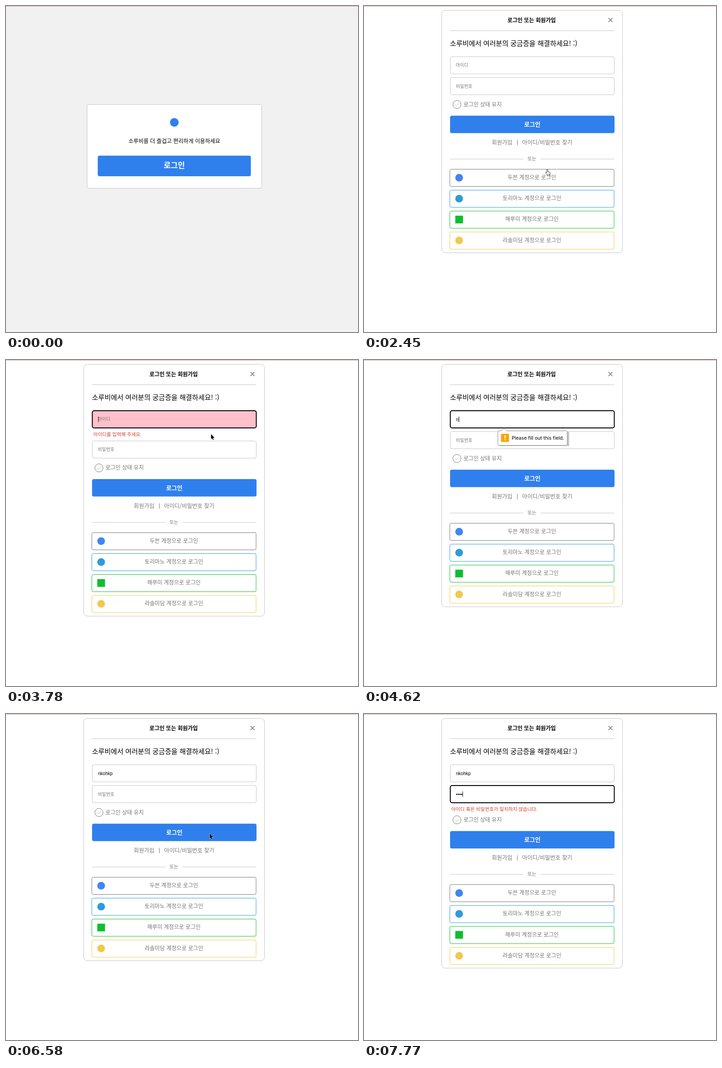
Animation, 777 px wide and 720 px high, one loop 8000 ms. Source, as an HTML page:

```html
<!DOCTYPE html>
<html lang="ko">
<head>
<meta charset="utf-8">
<title>로그인</title>
<style>
  html, body { margin: 0; width: 100%; height: 100%; overflow: hidden; background: #fff; }
  svg { display: block; width: 777px; height: 720px; }
  text { font: 400 12.1px 'Noto Sans CJK KR', 'Noto Sans CJK', 'Noto Sans KR', sans-serif; fill: #000; }
  .mid { text-anchor: middle; }
  .med { font-weight: 500; }
  .gray { fill: #767676; }
  .link { font-size: 12.4px; }
  .head { font-size: 15.1px; font-weight: 500; }
  .hint { font-size: 9.85px; fill: #767676; }
  .typed { font: 10.06px 'Liberation Sans', Arial, sans-serif; }
  .error { font-size: 10.6px; font-weight: 500; fill: #d33b2c; }
  .btn { font-size: 13.05px; font-weight: 700; fill: #fff; }
  .tip { font: 10.6px Inter, sans-serif; }
  .box { fill: #fff; stroke: #c4c4c4; }
  .line { stroke: #c4c4c4; }
  .blue { fill: #2f80ed; }
  .box.focus { stroke: #000; stroke-width: 2; }
  .box.bad { fill: #ffc0cb; }
</style>
</head>
<body>
<svg viewBox="0 0 777 720" xmlns="http://www.w3.org/2000/svg">
  <g id="welcome">
    <rect width="777" height="720" fill="#f1f1f1"/>
    <rect class="box" x="179" y="217.5" width="385.5" height="185" rx="4"/>
    <circle class="blue" cx="371.5" cy="257" r="9.5"/>
    <text class="mid med" x="371.5" y="302.6">소루비를 더 즐겁고 편리하게 이용하세요</text>
    <rect class="blue" x="202.5" y="330.5" width="338" height="45.5" rx="4"/>
    <text class="btn mid" x="371.5" y="358.4" style="font-size:17px">로그인</text>
  </g>

  <g id="login">
    <rect id="panel" class="box" x="171.5" y="9.5" width="399" height="535.5" rx="8"/>
    <text class="mid" x="370" y="35.6" style="font-weight:700">로그인 또는 회원가입</text>
    <path d="M539.5 26.5l9 9m0-9l-9 9" stroke="#767676" stroke-width="1.6"/>
    <path class="line" d="M190 54.5H552"/>
    <text class="head" x="189.7" y="87.7">소루비에서 여러분의 궁금증을 해결하세요! :)</text>

    <rect id="idBox" class="box" x="190.5" y="112" width="362" height="38" rx="4"/>
    <text id="idHint" class="hint" x="202.8" y="134.4">아이디</text>
    <text id="idText" class="typed" x="203" y="134.6"></text>
    <rect id="idCaret" y="125" width="1" height="12"/>
    <text id="idError" class="error" x="192.8" y="167.5">아이디를 입력해 주세요.</text>

    <g id="pw">
      <rect id="pwBox" class="box" x="190.5" y="158" width="362" height="38" rx="4"/>
      <text id="pwHint" class="hint" x="202.8" y="180.6">비밀번호</text>
      <g id="dots"></g>
      <rect id="pwCaret" y="171" width="1" height="12"/>
      <text id="pwError" class="error" x="192.8" y="213.7">아이디 혹은 비밀번호가 일치하지 않습니다.</text>
    </g>

    <g id="rest">
      <circle cx="205.2" cy="217.5" r="9" fill="none" stroke="#767676"/>
      <path d="M201 217.8l3 3 6-6" fill="none" stroke="#b0b0b0"/>
      <text class="med gray" x="219.4" y="221.6">로그인 상태 유지</text>
      <rect class="blue" x="190" y="242.3" width="363" height="38.4" rx="4"/>
      <text class="btn mid" x="371.5" y="266">로그인</text>
      <text class="link gray" x="282" y="306">회원가입</text>
      <path d="M338.5 295.5v12" stroke="#767676"/>
      <text class="link gray" x="349" y="306">아이디/비밀번호 찾기</text>
      <path class="line" d="M190 338H352M390 338H552"/>
      <text class="mid gray" x="370.6" y="341.3" style="font-size:10.6px">또는</text>
      <g id="social"></g>
    </g>

    <g id="bubble">
      <path d="M298 158.5h153a2 2 0 0 1 2 2v29.5h-155z" opacity=".22"/>
      <path d="M297.5 156.5h5.500l6-6 6 6h131.500a2 2 0 0 1 2 2v28a2 2 0 0 1-2 2h-149a2 2 0 0 1-2-2v-28a2 2 0 0 1 2-2z" fill="#fff" stroke="#8c8c8c"/>
      <rect x="302.5" y="163" width="17.5" height="18" rx="1.5" fill="#ffa400"/>
      <path d="M309.800 166.500h3l-.5 6.500h-2z" fill="#fff"/>
      <circle cx="311.3" cy="176" r="1.4" fill="#fff"/>
      <text class="tip" x="326" y="176.3">Please fill out this field.</text>
    </g>
  </g>

  <rect width="777" height="1" fill="#cfa39d"/>

  <path id="arrow" d="M.7 .3v11l2.500-2.400 1.600 3.800 1.700-.8-1.600-3.600h3.300z" stroke="#fff" paint-order="stroke"/>
  <g id="hand" fill="#fff" stroke="#222" stroke-width=".9" stroke-linejoin="round">
    <path d="M-1.500 1a1.200 1.200 0 0 1 2.400 0v4.200l4.400 .9q1.200 .4 1 1.800l-.9 4v2h-6v-1.800l-3.300-4.400q-.6-1.200 .4-1.500 .8-.2 2 1.200z"/>
    <path d="M1 9.500v2.600M2.700 9.500v2.600M4.200 9.500v2.600" stroke-width=".6"/>
  </g>
</svg>

<script>
const LOOP = 8000, STEP = 70;
const OPEN = 2310;                       // login panel replaces the welcome card
const ID_ERROR = 3290, ID_FIXED = 4270;
const BLUR = 6580, PW_ERROR = 6650, PW_FIXED = 7140;
const NAME = 'nkohkp', DOTS = 4, DOT_GAP = 3.6;

// Pointer moves: each starts where the last one ended; `via` bends the way.
const entry = [770, 0];
const moves = [
  { from: 0, until: 840, to: [372, 400], via: [-95, 989] },
  { from: 840, until: 980, to: [388, 380] },
  { from: 1050, until: 1750, to: [562, 573], via: [420, 767] },
  { from: 1750, until: 1960, to: [402, 338] },
  { from: 1960, until: 2100, to: [405, 361] },
  { from: 2730, until: ID_ERROR, to: [450, 264] },
  { from: ID_ERROR, until: 3850, to: [452, 159] },
  { from: 5460, until: 5810, to: [449, 250], via: [500, 200] },
  { from: 5950, until: 6370, to: [449, 264] }
];

const $ = id => document.getElementById(id);
const show = (id, on) => { $(id).style.display = on ? '' : 'none'; };
const put = (id, x, y) => $(id).setAttribute('transform', `translate(${x} ${y})`);
const within = (t, from, to) => t >= from && t < to;
const clamp = (v, low, high) => Math.min(high, Math.max(low, v));
const ramp = (t, from, to) => clamp((t - from) / (to - from), 0, 1);
const smooth = u => u * u * (3 - 2 * u);
const keysAt = (t, start, gap, max) => clamp(Math.floor((t - start) / gap) + 1, 0, max);

const accounts = [
  { name: '두븐', edge: '#767676', logo: '#4285f4' },
  { name: '토리마노', edge: '#2d9cdb', logo: '#2d9cdb' },
  { name: '해루미', edge: '#0bbf2f', logo: '#0bbf2f', square: true },
  { name: '라솔미담', edge: '#f2c94c', logo: '#f0c94e' }
];
$('social').innerHTML = accounts.map(({ name, edge, logo, square }, i) => `
  <g transform="translate(0 ${i * 46.2})">
    <rect x="189.5" y="360.5" width="362.5" height="38" rx="3" fill="#fff" stroke="${edge}"/>
    <rect x="201.5" y="370.7" width="17" height="17" rx="${square ? 0 : 8.5}" fill="${logo}"/>
    <text class="mid med gray" x="370.7" y="383">${name} 계정으로 로그인</text>
  </g>`).join('');
$('dots').innerHTML = Array.from({ length: DOTS }, (_, i) =>
  `<circle cx="${204.9 + i * DOT_GAP}" cy="177.5" r="1.4"/>`).join('');

function pointerAt(t) {
  let pos = entry;
  for (const { from, until, to, via } of moves) {
    if (t < from) break;
    const u = smooth(ramp(t, from, until)), v = 1 - u;
    pos = pos.map((p, i) => via
      ? v * v * p + 2 * u * v * via[i] + u * u * to[i]
      : v * p + u * to[i]);
  }
  return pos;
}

function drawPointer(t) {
  const [x, y] = pointerAt(t);
  const visible = within(t, STEP, 4130) || within(t, 5530, PW_FIXED);
  const onLink = t < OPEN
    ? within(x, 202, 541) && within(y, 330, 377)
    : y > 345;
  show('arrow', visible && !onLink);
  show('hand', visible && onLink);
  put('arrow', x, y);
  put('hand', x, y);
}

function drawForm(t) {
  const idBad = within(t, ID_ERROR, ID_FIXED);
  const pwFocus = t >= PW_ERROR;
  const typed = keysAt(t, 4480, 180, NAME.length);
  const dots = keysAt(t, PW_FIXED, 210, DOTS);
  const idShift = idBad ? 20.8 : 0;
  const shift = idShift + (pwFocus ? 16.2 : 0);

  $('panel').setAttribute('height', 535.5 + shift);
  put('pw', 0, idShift);
  put('rest', 0, shift);

  $('idBox').classList.toggle('focus', within(t, ID_ERROR, BLUR));
  $('idBox').classList.toggle('bad', idBad);
  $('idText').textContent = NAME.slice(0, typed);
  $('idCaret').setAttribute('x', 203.5 + (typed && $('idText').getComputedTextLength()));
  show('idHint', !typed);
  show('idError', idBad);
  show('idCaret', within(t, ID_ERROR, 3820) || within(t, ID_FIXED, 6020));

  $('pwBox').classList.toggle('focus', pwFocus);
  $('pwBox').classList.toggle('bad', within(t, PW_ERROR, PW_FIXED));
  [...$('dots').children].forEach((dot, i) => { dot.style.display = i < dots ? '' : 'none'; });
  $('pwCaret').setAttribute('x', 203 + dots * DOT_GAP);
  show('pwHint', !dots);
  show('pwError', pwFocus);
  show('pwCaret', pwFocus);

  $('bubble').style.opacity = ramp(t, 4200, 4550) * (1 - ramp(t, 5040, 5250));
}

function frame(now) {
  const t = Math.floor(now % LOOP / STEP) * STEP;
  show('welcome', t < OPEN);
  show('login', t >= OPEN);
  if (t >= OPEN) drawForm(t);
  drawPointer(t);
  requestAnimationFrame(frame);
}
frame(0);
</script>
</body>
</html>
```
